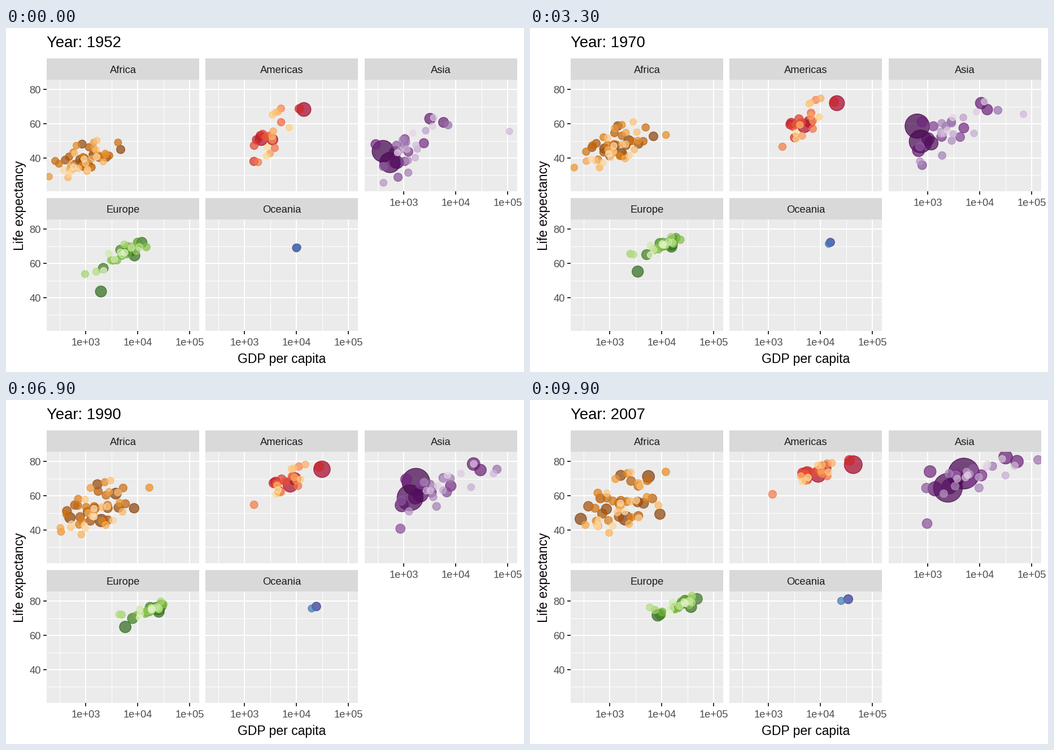
A matplotlib script for the animation above (10 s loop, 917 px wide and 611 px high).

```python
import numpy as np
import matplotlib.pyplot as plt
from matplotlib.animation import FuncAnimation
from matplotlib.colors import LinearSegmentedColormap
from matplotlib.patches import Rectangle

plt.rcParams["font.family"] = "Liberation Sans"
W, H, DPI = 917, 611, 64
PT = 72 / DPI  # points per pixel
FRAMES = 100
KNOTS = FIRST, MIDDLE, LAST = 1952, 1977, 2007
PANEL_W, PANEL_H = 270, 198
AXIS_TEXT = dict(px=18.33, color="#4D4D4D")

fig = plt.figure(figsize=(W / DPI, H / DPI), dpi=DPI, facecolor="white")
ax = fig.add_axes([0, 0, 1, 1])
ax.set(xlim=(0, W), ylim=(H, 0))
ax.axis("off")


def x_at(left, log_gdp):
    return left + 69 + 92 * (log_gdp - 3)


def y_at(top, life):
    return top + 17.4 + 3.04 * (80 - life)


def box(x, y, w, h, color):
    return ax.add_patch(Rectangle((x, y), w, h, fc=color, lw=0, zorder=0))


def line(x0, y0, x1, y1, color="white", px=2):
    ax.plot([x0, x1], [y0, y1], color=color, lw=px * PT, zorder=1,
            solid_capstyle="butt")


def text(x, y, s, px, color="black", **kw):
    return ax.text(x, y, s, fontsize=px * PT, color=color, va="baseline", **kw)


def draw_panel(name, left, top, y_axis, x_axis):
    right, bottom = left + PANEL_W, top + PANEL_H
    box(left, top - 38, PANEL_W, 37.5, "#D9D9D9")
    text(left + PANEL_W / 2, top - 11.5, name, 18.33, "#1A1A1A", ha="center")
    panel = box(left, top, PANEL_W, PANEL_H, "#EBEBEB")
    for life in (30, 50, 70):
        y = y_at(top, life)
        line(left, y, right, y, px=1)
    for power in (3, 4, 5):
        x = x_at(left, power - 0.5)
        line(x, top, x, bottom, px=1)
    for life in (40, 60, 80):
        y = y_at(top, life)
        line(left, y, right, y)
        if y_axis:
            line(left - 6, y, left, y, "#333333")
            text(left - 10, y + 6.8, str(life), ha="right", **AXIS_TEXT)
    for power in (3, 4, 5):
        x = x_at(left, power)
        line(x, top, x, bottom)
        if x_axis:
            line(x, bottom, x, bottom + 6, "#333333")
            text(x, bottom + 25.5, f"1e+0{power}", ha="center", **AXIS_TEXT)
    return panel


def scatter_unit(rng, n):
    """Bounded bell-shaped noise with mean 0 and deviation 1."""
    v = np.clip(rng.normal(size=n), -2, 2)
    return (v - v.mean()) / v.std()


def make_crowd(seed, n, corr, clouds):
    """Paths of n dots through three clouds; each dot keeps its rough rank."""
    rng = np.random.default_rng(seed)
    wealth, health = scatter_unit(rng, n), scatter_unit(rng, n)
    stops = []
    for gdp, gdp_sd, life, life_sd in clouds:
        g = 0.92 * wealth + 0.4 * scatter_unit(rng, n)
        h = corr * g + np.sqrt(1 - corr ** 2) * health
        stops.append(np.c_[gdp + gdp_sd * g, life + life_sd * h])
    return np.array(stops)


class Group:
    """One continent: named-size leaders plus a seeded crowd."""

    def __init__(self, name, left, top, ramp, growth, leaders, crowd=None,
                 biggest=0, y_axis=False, x_axis=False):
        panel = draw_panel(name, left, top, y_axis, x_axis)
        self.left, self.top, self.growth = left, top, growth
        rows = np.array(leaders)
        pop = rows[:, 0]
        stops = np.array([np.c_[np.log10(rows[:, k]), rows[:, k + 1]]
                          for k in (1, 3, 5)])
        if crowd:
            more = make_crowd(*crowd)
            pop = np.r_[pop, np.geomspace(biggest, 1, more.shape[1])]
            stops = np.concatenate([stops, more], axis=1)
        order = np.argsort(-pop)
        self.pop, self.stops = pop[order], stops[:, order]
        n = len(pop)
        colors = LinearSegmentedColormap.from_list(name, ramp.split())(
            np.linspace(0, 1, n))
        colors[:, 3] = 0.7
        zero = np.zeros(n)
        self.dots = ax.scatter(zero, zero, s=zero, c=colors, edgecolors=colors,
                               linewidths=1.48 * PT, zorder=3)
        self.dots.set_clip_path(panel)

    def move(self, year):
        k = 0 if year < MIDDLE else 1
        u = (year - KNOTS[k]) / (KNOTS[k + 1] - KNOTS[k])
        pos = (1 - u) * self.stops[k] + u * self.stops[k + 1]
        pop = self.pop * self.growth ** ((year - LAST) / (LAST - FIRST))
        size = 2 + 10 * np.sqrt(pop / 1318.7)
        self.dots.set_offsets(np.c_[x_at(self.left, pos[:, 0]),
                                    y_at(self.top, pos[:, 1])])
        self.dots.set_sizes(((4.45 * size + 1.48) * PT) ** 2)


# leaders: population, then (gdp, life) at each knot
# crowd: seed, count, correlation, (log gdp, sd, life, sd) at each knot
africa = Group(
    "Africa", 72, 92, "#7F3B08 #B35806 #E08214 #FDB863 #FEE0B6", 3.7,
    [(135, 1077, 36.3, 1982, 44.5, 2014, 46.9),
     (80, 1419, 41.9, 2785, 53.3, 5581, 71.3),
     (65, 781, 39.1, 796, 47.8, 278, 46.5),
     (44, 4725, 45, 8028, 55.5, 9270, 49.3),
     (6, 2388, 42.7, 21951, 57.4, 12057, 74)],
    (4, 47, 0.4, [(2.96, .27, 39, 5), (3.13, .31, 49.5, 6.5), (3.2, .4, 55, 9)]),
    biggest=42, y_axis=True)

americas = Group(
    "Americas", 353, 92, "#A50026 #D73027 #F46D43 #FDAE61 #FEE090", 2.2,
    [(301, 13990, 68.4, 24073, 73.4, 42952, 78.2),
     (190, 2109, 50.9, 6660, 61.5, 9066, 72.4),
     (109, 3478, 50.8, 7675, 65, 11978, 76.2),
     (33, 11367, 68.8, 22091, 74.2, 36319, 80.7),
     (8.5, 1840, 37.6, 1874, 49.9, 1202, 60.9)],
    (8, 20, 0.5, [(3.49, .18, 53.5, 8), (3.76, .18, 65, 5.5), (3.88, .24, 73.6, 2.8)]),
    biggest=44)

asia = Group(
    "Asia", 635, 92, "#40004B #762A83 #9970AB #C2A5CF #E7D4E8", 2.5,
    [(1318.7, 400, 44, 741, 64, 4959, 73),
     (1110, 547, 37.4, 813, 54.2, 2452, 64.7),
     (223, 750, 37.5, 1383, 52.7, 3541, 70.7),
     (169, 685, 43.4, 1176, 54, 2606, 65.5),
     (150, 684, 37.5, 660, 46.9, 1391, 64.1),
     (127, 3217, 63, 16610, 75.4, 31656, 82.6),
     (32, 779, 28.8, 786, 38.4, 975, 43.8),
     (2.5, 108382, 55.6, 59265, 69.3, 47307, 77.6)],
    (3, 25, 0.65, [(3.13, .32, 47, 8.5), (3.6, .44, 61, 7.5), (3.87, .47, 72.5, 5)]),
    biggest=90, x_axis=True)

europe = Group(
    "Europe", 72, 340, "#276419 #4D9221 #7FBC41 #B8E186 #E6F5D0", 1.25,
    [(82, 7144, 67.5, 20513, 72.5, 32170, 79.4),
     (71, 1969, 43.6, 4269, 59.5, 8458, 71.8),
     (7.6, 14734, 69.6, 26982, 75.4, 37506, 81.7),
     (4.6, 974, 53.8, 3528, 69.9, 7446, 74.9),
     (3.6, 1601, 55.2, 3533, 68.9, 5937, 76.4)],
    (6, 25, 0.8, [(3.73, .19, 66, 3.8), (4.14, .14, 72.5, 1.9), (4.38, .2, 78, 2.5)]),
    biggest=61, y_axis=True, x_axis=True)

oceania = Group(
    "Oceania", 353, 340, "#313695 #4575B4", 2.2,
    [(20.4, 10040, 69.1, 18334, 73.5, 34435, 81.2),
     (4.1, 10557, 69.4, 16234, 72.2, 25185, 80.2)],
    x_axis=True)

groups = (africa, americas, asia, europe, oceania)
title = text(72, 34.5, "", 27.5)
text(488, 595, "GDP per capita", 22.92, ha="center")
text(30.5, 315, "Life expectancy", 22.92, ha="center", rotation=90,
     rotation_mode="anchor")


def update(i):
    year = FIRST + (LAST - FIRST) * i / (FRAMES - 1)
    title.set_text(f"Year: {year:.0f}")
    for group in groups:
        group.move(year)


anim = FuncAnimation(fig, update, frames=FRAMES, interval=100, repeat=True,
                     repeat_delay=0, init_func=lambda: update(0))
plt.show()
```
